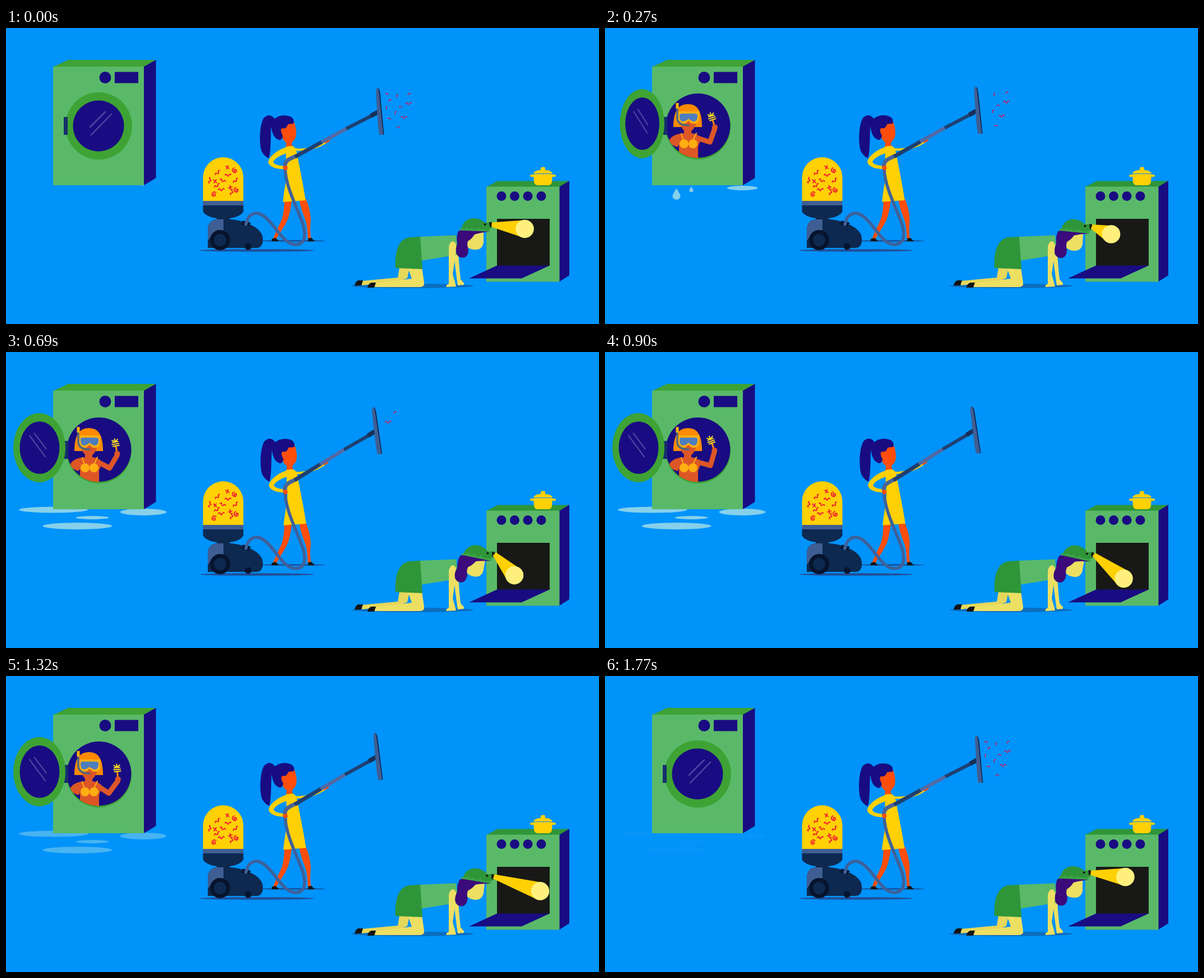
An HTML page that plays this animation: 1058x529 px, repeating every 1800 ms.

```html
<!DOCTYPE html>
<html lang="en">
<head>
<meta charset="utf-8">
<title>Household helpers</title>
<style>
  html, body { margin: 0; width: 100%; height: 100%; overflow: hidden; background: #0093fa; }
  svg { display: block; width: 100vw; height: 100vh; }
  .navy { fill: #190c82; }
  .mint { fill: #5ab969; }
  .leaf { fill: #3ea334; }
  .moss { fill: #2e9638; }
  .yellow { fill: #ffd004; }
  .flame { fill: #ff4e0b; }
  .skin { fill: #dd5626; }
  .lemon { fill: #eddf62; }
  .ink { fill: #0e2950; }
  .slate { fill: #3f5e93; }
  .black { fill: #141414; }
  .line { fill: none; stroke-linecap: round; stroke-linejoin: round; }
</style>
</head>
<body>
<svg viewBox="0 0 1058 529" preserveAspectRatio="none">
  <defs>
    <clipPath id="hole"><circle cx="166" cy="175" r="57.5"/></clipPath>
    <path id="wave" d="M-5 1q1.700-3.500 3.400 0t3.400 0t3.400-1"/>
    <path id="dash" d="M-2.5 1q2.5-3 5-1"/>
    <path id="cross" d="M-3-2L3 2M-1.5 3L1.5-3"/>
    <path id="curl" d="M0 0q-2-2 0-3q4 0 3 3q-2 4-6 1q-3-5 2-7"/>
  </defs>

  <!-- washing machine -->
  <g id="water" fill="#86d0ea"></g>
  <path class="leaf" d="M84 69.500L111 57H267L246 69.500z"/>
  <path class="navy" d="M246 69L267.500 57V268L246 281z"/>
  <path class="mint" d="M84 69H246V281H84z"/>
  <circle class="navy" cx="177" cy="88.500" r="10.500"/>
  <path class="navy" d="M194 78.500h42v20h-42z"/>
  <circle class="leaf" cx="166" cy="177" r="58"/>
  <circle class="navy" cx="166" cy="174.500" r="57.500"/>
  <g clip-path="url(#hole)">
    <path d="M122 177C122 150 130 136 148 136S173 150 173 177z" fill="#ff8a00"/>
    <path class="skin" d="M134 150H163V168Q160 180 154 184V188Q166 189 172 197L166 212V236H132V209L129 213L118 208L106 222V210L119 195Q126 189 141 188V183Q135 178 134 168z"/>
    <path id="arm" class="line" stroke="#dd5626" stroke-width="9"/>
    <g id="brush">
      <path class="line" d="M0 0V-13" stroke="#ff8a00" stroke-width="3"/>
      <path class="line" d="M-5-13H6M-6-16.500H6M-5-20L5-20M-5-24L0-20L5-24M0-20V-26" stroke="#ffdf1a" stroke-width="2"/>
      <circle class="skin" cx="0" cy="1" r="5"/>
    </g>
    <path class="line" d="M136 189L140 201M163 188L157 201" stroke="#ffae12" stroke-width="2"/>
    <g fill="#ffae12">
      <circle cx="141" cy="207" r="8"/><circle cx="157" cy="207" r="8"/>
      <path d="M130 149H168V163Q167 171 160 171H155L149 166L143 171H138Q131 171 130 163z"/>
    </g>
    <path d="M137 153H161Q166 153 165 159Q164 167 159 167Q154 167 149 162Q144 167 139 167Q134 167 133 159Q132 153 137 153z" fill="#4e7ebd"/>
    <path class="line" d="M129 143V160Q129 174 149 174" stroke="#51677e" stroke-width="3.500"/>
    <path d="M126.500 134h5v10h-5z" fill="#ffb400"/>
  </g>
  <path id="hinge" d="M103 159h8v32h-8z" fill="#15306c"/>
  <g id="door">
    <ellipse class="leaf" cx="59.500" rx="59.500" ry="60"/>
    <ellipse class="navy" cx="59" rx="45.500" ry="45.500"/>
    <path class="line" d="M44 2L71-25M46 16L82-21" stroke="#4c47a3" stroke-width="2.500"/>
  </g>
  <path id="latch" d="M103 159h7v32h-7z" fill="#15306c"/>

  <!-- vacuum cleaner -->
  <ellipse cx="448" cy="397.500" rx="102" ry="2.300" fill="#1f4f98"/>
  <ellipse cx="510" cy="380.500" rx="60" ry="1.300" fill="#174e98"/>
  <path class="ink" d="M376 334H399V344H376z"/>
  <path class="ink" d="M360 393V360Q361 343 376 342H402C430 345 452 357 457 370Q460 382 456 388Q454 393 446 393z"/>
  <path class="slate" d="M360 380V360Q361 343 376 342H388V362L366 372z"/>
  <circle cx="432" cy="390.500" r="6" fill="#06142e"/>
  <circle cx="382" cy="379" r="18" fill="#06142e"/>
  <circle class="ink" cx="382" cy="379" r="11"/>
  <path class="line" d="M421 350L433 353M423 346L435 349" stroke="#06142e" stroke-width="3"/>
  <path class="yellow" d="M351.500 310V267A36 36 0 0 1 423.500 267V310z"/>
  <path class="slate" d="M351.500 309H423.500V318H351.500z"/>
  <path class="ink" d="M351.500 317H423.500V328Q417 340 388 341Q358 340 351.500 328z"/>
  <g id="dirt" class="line" stroke="#f01436" stroke-width="1.800"></g>

  <!-- woman with the wand -->
  <path class="flame" d="M497 305H510C508 325 505 340 498 351C492 362 486 369 483 377L477 376C481 364 488 352 492 342C496 330 496 320 497 305z"/>
  <path class="flame" d="M523 305H535C541 320 544 333 543.500 346C542 358 543 368 544 377L538.500 376C538 362 537 349 533 340C529 330 525 318 523 305z"/>
  <path class="black" d="M474 381V377L481 375L487 381zM539 381V376L545 375L551 381z"/>
  <g id="torso">
    <path class="flame" d="M494 170L514 168C518 180 519 189 516 197C514 202 510 202 510 206L511 213H499L500 205C494 200 489 192 489 182z"/>
    <path class="navy" d="M473 176C474 161 488 155 500 156.500C512 158 515 164 513 171L503 172C501 178 497 181 494 179C488 180 491 187 494 193C493 198 490 201 487 200C478 197 475 188 473 176z"/>
    <path class="navy" d="M480 164C476 155 466 153 459 162C451 180 452 212 457 222Q462 230 469 233C473 220 472 195 473 177z"/>
    <path class="yellow" d="M499 212L511 211C520 214 518 224 521 234C526 260 532 290 534.500 308L494 311C496 290 501 270 501 252C499 240 500 225 499 212z"/>
    <path class="yellow" d="M508 211C488 214 468 230 468 240C470 250 488 253 498 252V246C486 247 477 243 477 239C479 233 492 226 504 223z"/>
  </g>
  <path class="line" d="M428 351C431 335 442 327 455 333C478 345 492 385 515 387C533 388 535 372 531 355C525 332 498 285 498 250" stroke="#3f609a" stroke-width="5.500"/>
  <g id="tool">
    <path class="line" d="M513 217Q545 220 570 204.500" stroke="#ffd004" stroke-width="4"/>
    <path class="flame" d="M568 204Q571 198 578 198L577 203L570 206z"/>
    <path class="line" d="M498 250C496 238 503 235 517 229" stroke="#4a6496" stroke-width="7"/>
    <g fill="none" stroke-width="6.500">
      <path d="M516 230L564 203.500" stroke="#1f3f70" stroke-width="7"/>
      <path d="M606 180.500L654 156" stroke="#1f3f70" stroke-width="6"/>
      <path d="M563 204L607 180" stroke="#5169a5"/>
      <path d="M651 157L664 150" stroke="#173058" stroke-width="8"/>
    </g>
    <path d="M663 107Q667 107 668 120L674.500 191H667z" fill="#112c59"/>
    <path class="slate" d="M660 114Q661 105 664 107L665.500 116L671 172L673 191H666L664 178z"/>
    <g id="dust" class="line" stroke="#c21f62" stroke-width="1.600"></g>
  </g>
  <circle class="flame" cx="498.500" cy="250" r="4"/>

  <!-- oven -->
  <path class="moss" d="M857 284L877 273.500H1005L987 284z"/>
  <path class="navy" d="M987 284L1005 273V442L987 453.500z"/>
  <path class="mint" d="M857 283.500H987.500V453.500H857z"/>
  <g class="navy">
    <circle cx="884" cy="300.500" r="8.500"/><circle cx="907.500" cy="300.500" r="8.500"/>
    <circle cx="931" cy="300.500" r="8.500"/><circle cx="955" cy="300.500" r="8.500"/>
  </g>
  <path d="M876 341H970V425H876z" fill="#181916"/>
  <path class="navy" d="M876 424.500H970L920 447.500H826z"/>
  <g class="yellow">
    <path d="M941 261H975L974 275Q973 281 967 281H949Q943 281 942 275z"/>
    <path d="M941 260Q943 253.500 958 253.500T975 260z"/>
    <rect x="954" y="248.500" width="8" height="6" rx="2"/>
    <rect x="935" y="262" width="46" height="4" rx="2"/>
  </g>

  <!-- woman at the oven -->
  <ellipse cx="725" cy="461" rx="110" ry="4" fill="#0b6ebf"/>
  <path d="M702 428H720L716 447L700 453L635 460V452L699 446z" fill="#e6d75a"/>
  <path class="lemon" d="M717 428H742L746 455Q747 463 738 463H657V456L724 448z"/>
  <path class="black" d="M622 460.500Q623 453 629 451H637L634 460zM645 464Q646 457 652 455H660L657 464z"/>
  <path class="lemon" d="M799 394L806 390L809 430L811 449L817 456V459L806 460L804 446L800 415z"/>
  <path class="mint" d="M736 373L803 370.500L807 405L740 416z"/>
  <path class="moss" d="M739 373L743 431L695 429C693 400 700 377 720 374z"/>
  <path class="lemon" d="M790 392Q791 382 798 381Q805 384 803 397L797 440L802 458L803 462L786 463Q784 460 790 457z"/>
  <g id="head">
    <path class="lemon" d="M822 378L834 366L852 364V384Q850 395 840 396Q828 397 822 390z"/>
    <path d="M807 363Q830 356 862 364Q845 366 836 369Q830 378 824 381Q822 388 825 396Q825 407 818 410Q808 412 804 404Q801 396 805 386Q803 372 807 363z" fill="#3b0a7b"/>
    <path class="moss" d="M812 361C814 346 825 339 836 340C848 341 852 346 855 348L867 346V357L857 362z"/>
    <path class="line" d="M811 360L862 362" stroke="#3aa447" stroke-width="3.500"/>
    <path class="line" d="M821 357v1M831 358v1M843 358v1" stroke="#46a953" stroke-width="2.500"/>
    <circle cx="854.500" cy="351" r="2" class="black"/>
    <path class="black" d="M862 347L867 347.500V356L863 355z"/>
  </g>
  <path id="beam" class="yellow"/>
  <circle id="spot" r="16.300" fill="#fff07d"/>
</svg>
<script>
const LOOP = 1800, STEP = 30;
const $ = id => document.getElementById(id);
const set = (el, attrs) => { for (const k in attrs) el.setAttribute(k, attrs[k]); return el; };
const add = (parent, tag, attrs) =>
  parent.appendChild(set(document.createElementNS('http://www.w3.org/2000/svg', tag), attrs));
const clamp = x => Math.min(1, Math.max(0, x));
const mix = (a, b, k) => a + (b - a) * k;
const easeOut = x => 1 - (1 - clamp(x)) ** 3;
const easeInOut = x => (x = clamp(x)) < .5 ? 4 * x ** 3 : 1 - 4 * (1 - x) ** 3;
const place = (x, y, turn) => `translate(${x} ${y}) rotate(${turn})`;

// shape, x, y, rotation
[['cross', 395, 249, 0], ['curl', 408, 256, 0], ['wave', 377, 258, -40], ['wave', 396, 262, 0],
 ['wave', 363, 272, -75], ['cross', 373, 274, 10], ['wave', 387, 272, 25], ['wave', 409, 272, -40],
 ['wave', 376, 281, -30], ['wave', 384, 288, 0], ['cross', 400, 285, 50], ['wave', 402, 293, -70],
 ['curl', 370, 298, 60], ['curl', 411, 291, 0]
].forEach(([shape, x, y, r]) => add($('dirt'), 'use', { href: '#' + shape, transform: place(x, y, r) }));

// shape, x, y, rotation, time at which the nozzle swallows it
const dust = [
  ['dash', 680, 118, 30, 230], ['dash', 698, 121, -60, 545], ['dash', 719, 118, -20, 890],
  ['dash', 685, 129, -30, 260], ['wave', 718, 134, 0, 779], ['dash', 704, 141, 20, 649],
  ['dash', 679, 142, -70, 220], ['dash', 695, 151, -60, 580], ['wave', 710, 159, 0, 660],
  ['dash', 684, 162, 40, 250], ['dash', 700, 177, 10, 634]
].map(([shape, x, y, turn, gone]) =>
  ({ x, y, turn, gone, el: add($('dust'), 'use', { href: '#' + shape }) }));

// puddles spread when their drop lands
const puddles = [[84.5, 282, 62, 5.5, 372], [154, 296, 29.5, 3, 340], [245, 286, 41.5, 6, 150], [127.5, 311, 62, 6, 336]]
  .map(([x, y, rx, ry, hit]) => ({
    x, y, rx, ry, hit,
    pool: add($('water'), 'ellipse', { cx: x, cy: y }),
    drop: add($('water'), 'path', { d: 'M0-11C2-5 7-1 7 4A7 6 0 0 1-7 4C-7-1-2-5 0-11z' })
  }));

function drawWasher(t) {
  const open = easeInOut(t / 360) - easeInOut((t - 1347) / 360);
  const lift = Math.min(1, open * 2.2);
  set($('door'), { transform: `translate(106 ${175 - 4 * lift}) scale(${mix(1, -.78, open)} ${1 + .028 * lift})` });
  $('latch').style.display = open < .1 ? '' : 'none';

  const wave = (1 - Math.cos((t - 180) / 720 * 2 * Math.PI)) / 2;
  const handX = mix(195, 200, wave), handY = mix(175, 184, wave);
  set($('arm'), { d: `M163 196L${mix(188, 183, wave)} ${mix(203, 210, wave)}L${handX} ${handY + 4}` });
  set($('brush'), { transform: place(handX, handY, mix(-20, -4, wave)) });

  set($('water'), { opacity: clamp((LOOP - t) / 900) });
  for (const p of puddles) {
    const grow = easeOut((t - p.hit) / 400);
    const depth = p.y - 281, fall = 1 - (p.hit - t) / 140;
    set(p.pool, { rx: p.rx * grow, ry: p.ry * grow });
    p.drop.style.display = fall > -.3 && fall < 1 ? '' : 'none';
    set(p.drop, { transform: `translate(${p.x} ${281 + depth * fall}) scale(${depth / 30})` });
  }
}

function drawVacuum(t, sway) {
  set($('torso'), { transform: `translate(${1.3 * sway} ${-1.3 * sway})` });
  set($('tool'), { transform: `rotate(${-3.4 * sway} 498 250)` });
  const back = t > 1400;
  set($('dust'), { opacity: back ? clamp((t - 1460) / 260) : 1 });
  for (const d of dust) {
    const pull = back ? 0 : (t / d.gone) ** 4;
    d.el.style.display = pull < 1 ? '' : 'none';
    set(d.el, { transform: place(mix(d.x, 669, pull), d.y, d.turn) });
  }
}

function drawOven(phase, nod) {
  set($('head'), { transform: `rotate(${10.3 * nod} 805 385)` });
  const x = 925.5 - 27.7 * Math.sin(phase), y = 382 - 23 * Math.cos(phase);
  const tipX = 866.5 + 5.5 * nod, tipY = 351.5 + 10.5 * nod;
  const angle = Math.atan2(y - tipY, x - tipX);
  const nx = -Math.sin(angle), ny = Math.cos(angle);
  const corner = (cx, cy, r) => `${cx + nx * r} ${cy + ny * r}`;
  set($('beam'), { d: `M${corner(tipX, tipY, -4)}L${corner(x, y, -16)}L${corner(x, y, 16)}L${corner(tipX, tipY, 4)}z` });
  set($('spot'), { cx: x, cy: y });
}

function frame() {
  const t = Math.floor(performance.now() % LOOP / STEP) * STEP;
  const phase = t / LOOP * 2 * Math.PI;
  const sway = (1 - Math.cos(phase)) / 2;
  drawWasher(t);
  drawVacuum(t, sway);
  drawOven(phase, sway ** .7);
  requestAnimationFrame(frame);
}
frame();
</script>
</body>
</html>
```
